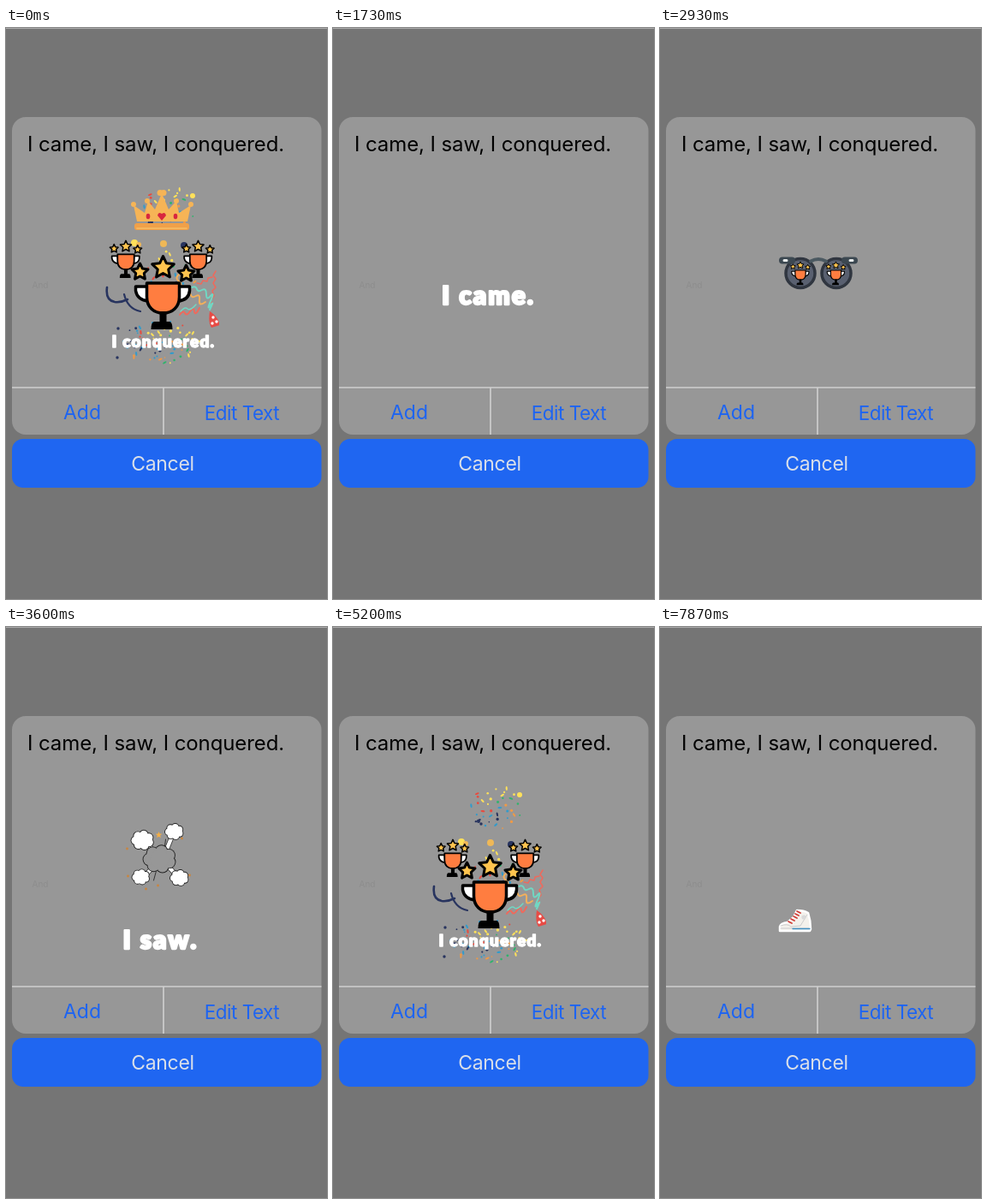
Animation, 375 px wide and 667 px high, one loop 8 s. Source, as an HTML page:

```html
<!DOCTYPE html>
<html lang="en">
<head>
<meta charset="utf-8">
<title>I came, I saw, I conquered.</title>
<style>
  html, body { margin: 0; width: 100%; height: 100%; overflow: hidden; background: #757575; }
  svg { display: block; width: 100%; height: 100%; }
  .ui { font-family: Inter, Roboto, sans-serif; font-size: 23px; text-anchor: middle; }
  .link { fill: #1d64f2; }
  .caption {
    font-family: Lato, sans-serif; font-weight: 900; letter-spacing: .065em;
    fill: #fff; stroke: #fff; stroke-width: .075em; stroke-linejoin: round;
  }
</style>
</head>
<body>
<svg viewBox="0 0 375 667">
  <defs>
    <clipPath id="window"><rect x="115" y="162" width="134" height="235"/></clipPath>
    <linearGradient id="burst" x2="0" y2="1">
      <stop offset=".2" stop-color="#12b58b"/><stop offset=".9" stop-color="#c4ee55"/>
    </linearGradient>
    <linearGradient id="fire" x2="0" y2="1">
      <stop offset=".2" stop-color="#e8281e"/><stop offset=".8" stop-color="#ffc62e"/>
    </linearGradient>
  </defs>
  <rect width="375" height="667" fill="#757575"/>
  <rect width="375" height="1" fill="#a9a9a9"/>
  <rect x="7" y="104" width="361.500" height="371" rx="16" fill="#979797"/>
  <path d="M7 420H368.500M184 420V475" stroke="#d0d0d0" stroke-width="1.600"/>
  <rect x="7" y="480" width="361.500" height="57" rx="13" fill="#1f66f1"/>
  <g class="ui">
    <text x="25" y="144" font-size="24" letter-spacing="-.1" text-anchor="start">I came, I saw, I conquered.</text>
    <text class="link" x="89" y="457">Add</text>
    <text class="link" x="275.500" y="457.500" font-size="22.500" letter-spacing="-.5">Edit Text</text>
    <text x="183" y="517" fill="#d9dfe9" letter-spacing="-.3">Cancel</text>
    <text x="40" y="304" font-size="10" fill="#8d8d8d">And</text>
  </g>
  <g id="stage" clip-path="url(#window)"></g>
</svg>
<script>
const place = (art, x, y, scale = 1) => `<g transform="translate(${x} ${y}) scale(${scale})">${art}</g>`;
const line = (d, color, width = 1.5) =>
  `<path d="${d}" fill="none" stroke="${color}" stroke-width="${width}" stroke-linecap="round" stroke-linejoin="round"/>`;
const dot = (x, y, r, color) => `<circle cx="${x}" cy="${y}" r="${r}" fill="${color}"/>`;
const caption = (text, x, y, size) => `<text class="caption" x="${x}" y="${y}" font-size="${size}">${text}</text>`;

function star(x, y, outer, inner, count, paint) {
  const points = Array.from({ length: count * 2 }, (_, i) => {
    const a = i * Math.PI / count - Math.PI / 2, r = i % 2 ? inner : outer;
    return (x + r * Math.cos(a)).toFixed(1) + ',' + (y + r * Math.sin(a)).toFixed(1);
  });
  return `<polygon points="${points.join(' ')}" ${paint} stroke-linejoin="round"/>`;
}

// A ring of overlapping circles, outlined as a single shape.
function cloud(x, y, r, fill = '#fff', squash = .8) {
  const ring = grow => Array.from({ length: 7 }, (_, i) => {
    const a = i * Math.PI * 2 / 7 + .4;
    return dot(x + r * .64 * Math.cos(a), y + r * .64 * squash * Math.sin(a), r * .36 + grow, grow ? '#222' : fill);
  }).join('');
  return ring(.9) + ring(0) + dot(x, y, r * .56, fill);
}

// Confetti spread evenly over an ellipse by the golden angle, with random sizes and turns.
function confetti(count, cx, cy, rx, ry, seed) {
  const random = () => (seed = seed * 16807 % 2147483647) / 2147483647;
  const colors = ['#329bcb', '#e84a3e', '#2fb36c', '#28345f', '#ffe15a', '#f09a45', '#329bcb', '#ffe15a'];
  let art = '';
  for (let i = 0; i < count; i++) {
    const a = i * 2.4 + random() * .6, d = Math.sqrt((i + random()) / count);
    const x = cx + rx * d * Math.cos(a), y = cy + ry * d * Math.sin(a), color = colors[i % 8];
    art += i % 3 ? dot(x, y, .8 + random() * .9, color)
      : `<ellipse cx="${x}" cy="${y}" rx="2.500" ry="1.100" fill="${color}" transform="rotate(${random() * 180} ${x} ${y})"/>`;
  }
  return art;
}

const shoe = `
  <path d="M-18 12V7Q-17 3-9 2L-2-4 2-12Q10-12 15-9 18 0 18 10L17 12Z" fill="#f3f1ec" stroke="#fff" stroke-width="2.500" stroke-linejoin="round"/>`
  + line('M-17 6Q-9 3-5 7L6 6 14-7M-17 9H16', '#b9bbbd', .7) + line('M-3 9.500H17', '#3e8fc2', 1.4)
  + line('M-8 1l4 2M-5-2l4 2M-2-5l4 2M0-8l4 2M2-11l4 2', '#cf3b35', 1.7) + dot(10, -4, 2.6, '#dadada');

const boom = star(0, 0, 34, 20, 16, 'fill="url(#burst)" stroke="#e23a2c" stroke-width="1.500"')
  + cloud(26, -17, 9) + cloud(19, 17, 9) + cloud(-24, -17, 8) + cloud(-22, 17, 8)
  + `<text text-anchor="middle" y="7" transform="rotate(-7) skewX(-8)" font-family="Inter, sans-serif" font-weight="900" font-size="19"
    fill="url(#fire)" stroke="#1b1010" stroke-width="2.500" paint-order="stroke">BOOM!</text>`;

const starPaint = 'fill="#ffc44f" stroke="#000" stroke-width="3"';
const trophy = `
  <g stroke="#000" stroke-width="3.500" stroke-linejoin="round">
    <path d="M-19-7H-32V-2Q-30 9-17 10ZM19-7H31V-2Q30 9 17 10Z" fill="#fff"/>
    <path d="M-19-11H19V5C19 17 11 24 0 24S-19 17-19 5Z" fill="#ff7d40"/>
  </g>
  <path d="M-4 22H4V34H8Q11 35 11 43H-14Q-14 34-10 34H-4Z"/>`
  + star(0, -29, 13.5, 6.5, 5, starPaint) + star(-27, -24, 10, 5, 5, starPaint) + star(27, -22, 10, 5, 5, starPaint);

const frames = [-21, 21].map(x => `<circle cx="${x}" cy="1" r="17" fill="#596070" stroke="#303640" stroke-width="3.500"/>`).join('')
  + line('M-9-13Q0-18 9-13', '#4b5961', 4) + line('M-42-14H-31M42-14H31', '#3c4851', 8) + line('M-40-14H-37M40-14H37', '#e8ecec', 3);
const glasses = frames + line('M-30-4l10-8M-28 4l18-14M12-4l10-8M14 4l18-14', '#737a88', 1.5);
const proudGlasses = frames + place(trophy, -21, 1, .32) + place(trophy, 20.5, 1, .32);

const trails = 'M-9-11l-8-11M9-13l6-15M-9 11l-9 9M11 10l9 9';
const smoke = line(trails, '#333', 6) + line(trails, '#fff', 4.4) + line('M-4 14l-3 11M6-15l1-8', '#333', 1)
  + cloud(0, 0, 19, '#979797', .75) + cloud(-20, -22, 13) + cloud(17, -32, 10.5) + cloud(-22, 21, 10) + cloud(23, 22, 10.5)
  + star(-1, -28, 4, 1.7, 5, 'fill="#f3ad45"')
  + [[-38, -12], [-37, 20], [35, 19], [-16, 35], [-2, 31], [26, -24]].map(([x, y]) => dot(x, y, 1.4, '#c9853f')).join('');

const crown = `
  <g fill="#f6b456">
    <path d="M-29 12L-33-7-20 2-16-12-8-2 0-21 8-2 17-12 20 2 34-7 30 12Z"/>
    <rect x="-32" y="14" width="64" height="8" rx="3" fill="#f0a049"/>
  </g>`
  + line('M-29 20H29', '#f8c066', 1.6)
  + [[-2, -21.5, 3.5], [2, -21.5, 3.5], [-17, -12, 3], [17, -12, 3], [-33, -8, 3], [34, -8, 3]]
    .map(([x, y, r]) => dot(x, y, r, '#f6b456')).join('')
  + '<path d="M0 11L-5 5Q-4 0 0 3 4 0 5 5Z" fill="#d8263f"/>'
  + [-16, 16].map(x => `<ellipse cx="${x}" cy="6" rx="2.300" ry="3.300" fill="#d8263f"/>`).join('');

const topConfetti = confetti(38, 0, 0, 32, 25, 7001)
  + dot(28, -15, 3, '#ffe15a') + dot(-20, 16, 2, '#28345f') + dot(-17, 19, 1.7, '#28345f');
const lowConfetti = confetti(72, 181, 367, 46, 25, 4100) + confetti(22, 192, 288, 30, 28, 9000)
  + dot(131, 351, 1.7, '#28345f') + dot(130, 385, 1.7, '#28345f')
  + [[184, 252, 4, '#efb857'], [150, 251, 4, '#ffe15a'], [155, 253, 3, '#efb857'], [208, 254, 4, '#28345f']].map(d => dot(...d)).join('');
const streamers = line('M118 303Q116 318 127 320 134 321 142 317', '#28345f', 2.6)
  + line('M138 311Q142 328 157 331', '#28345f', 2.2)
  + line('M245 284l-3 5 3 4-3 5 3 5-4 4 2 6-4 5 2 6M241 291l-5 1-1 4-5-1-2 4-5-1', '#ef695c')
  + line('M217 303q5-2 6 2t6 1 5 5 5 2 0 6 0 5-1 5', '#71d7c3', 2)
  + line('M211 310q4-2 5 2t6 1 4 5 7 2M202 288q-5 4 0 8t0 8', '#f3b05b', 2)
  + line('M203 335q4-6 6-2t6-2 5 0 6-4', '#ef695c', 2) + line('M204 331q5-6 8-3t10-5', '#71d7c3')
  + '<path d="M238 331Q247 336 250 347L240 350Q236 344 238 331Z" fill="#e74b45"/>'
  + [[242, 338], [246, 343], [241, 345]].map(([x, y]) => dot(x, y, 1.7, '#fff')).join('');

const came = caption('I came.', 127, 322.5, 30);
const saw = caption('I saw.', 136.5, 375.5, 30);
const conquered = caption('I conquered.', 123.5, 373, 19);
const shoes = (...spots) => spots.map(([x, y]) => place(shoe, x, y)).join('');
const leftCup = place(trophy, 140, 270, .51);
const cups = leftCup + place(trophy, 224.5, 270, .51);
const party = cups + lowConfetti + conquered;
const fullParty = lowConfetti + streamers + cups + conquered;
const topBurst = scale => place(topConfetti, 190, 211, scale);
const victory = lowConfetti + topBurst(1) + streamers + cups + place(trophy, 183.5, 309) + conquered;
const crowned = scale => victory + place(crown, 182, 232 - 18 * scale, scale);

const scenes = [
  [0, crowned(1)],
  [870, ''],
  [1000, shoes([164, 201])],
  [1130, shoes([158, 343])],
  [1270, shoes([151.5, 247.5], [195.5, 304.5]) + came],
  [1400, shoes([207, 203], [157, 364]) + came],
  [1530, shoes([152, 203], [207, 304]) + came],
  [1670, shoes([207, 247]) + came],
  [1730, came],
  [1930, place(boom, 182, 280, 3.5)],
  [2000, place(boom, 205, 300, 1.8)],
  [2130, place(boom, 118, 241)],
  [2270, ''],
  [2530, place(glasses, 182.5, 284.5, .94)],
  [2730, place(glasses, 182.5, 284.5, 4)],
  [2800, place(proudGlasses, 182.5, 284.5, 2.2)],
  [2930, place(proudGlasses, 185, 285.5)],
  [3070, place(boom, 182, 272, 2.5)],
  [3200, place(boom, 182, 272, 1.6)],
  [3330, place(smoke, 179, 271, 1.5)],
  [3470, place(smoke, 179, 271, 1.6) + saw],
  [3600, place(smoke, 179.5, 271) + saw],
  [3730, saw],
  [3870, leftCup],
  [4000, cups],
  [4130, cups + place(lowConfetti, -92, -160, 1.5)],
  [4200, cups + lowConfetti],
  [4330, party],
  [4470, place(streamers, 37, 62, .8) + party],
  [4530, fullParty],
  [4670, topBurst(2.2) + fullParty],
  [4800, topBurst(1.5) + fullParty],
  [4930, topBurst(1) + fullParty],
  [5070, topBurst(1) + fullParty + place(trophy, 183.5, 223)],
  [5200, victory],
  [5930, crowned(2.2)],
  [6070, crowned(1.7)],
  [6200, crowned(1.3)],
  [6330, crowned(1)],
  [7600, ''],
  [7730, shoes([164, 201])],
  [7870, shoes([158, 343])]
];

const stage = document.getElementById('stage');
const start = performance.now();
let current;
function draw(now) {
  const time = Math.max(0, now - start) % 8000;
  const scene = scenes.findLast(([at]) => at <= time);
  if (scene !== current) {
    current = scene;
    stage.innerHTML = scene[1];
  }
  requestAnimationFrame(draw);
}
draw(start);
</script>
</body>
</html>
```
